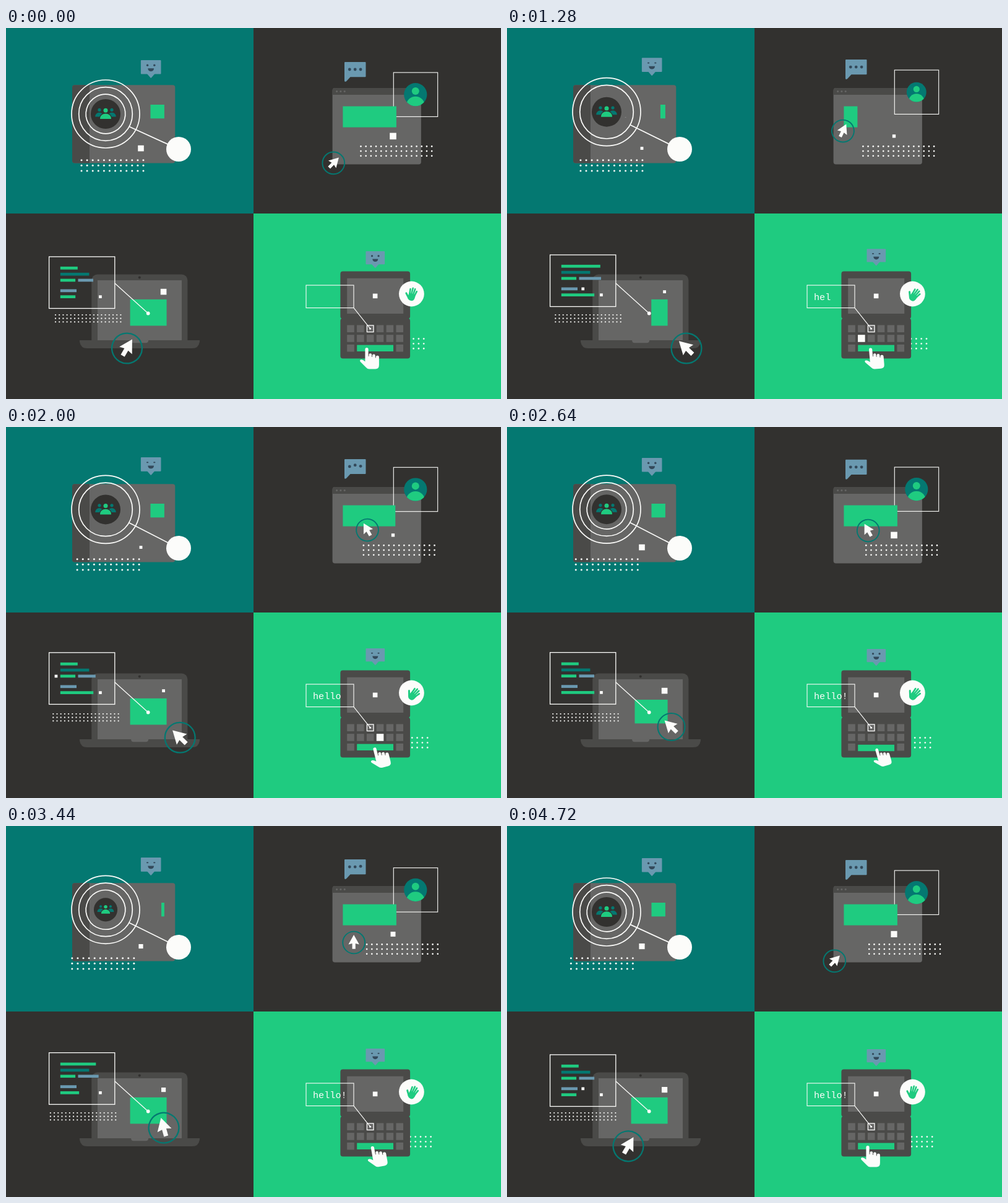
These frames come from a looping animation (800x600 px, 4800 ms). An HTML page:

```html
<!DOCTYPE html>
<html lang="en">
<head>
<meta charset="utf-8">
<title>Devices</title>
<style>
html, body { margin: 0; width: 100%; height: 100%; overflow: hidden; }
svg { display: block; width: 100%; height: 100%; }
.dark { fill: #32312f; }
.edge { fill: #4a4a48; }
.grey { fill: #666665; }
.teal { fill: #047871; }
.green { fill: #1fcb80; }
.blue { fill: #6a99b0; }
.ink { fill: #33495a; }
.white { fill: #fcfcfa; }
.line { fill: none; stroke: #fcfcfa; }
.ring { fill: none; stroke: #047871; }
text { font: 15.2px "Liberation Mono", "Noto Sans Mono", monospace; }
</style>
</head>
<body>
<svg viewBox="0 0 800 600">
  <defs>
    <g id="bubble" class="blue">
      <rect x="-16.3" width="32.6" height="22.6" rx="1"/>
      <path d="M-6.3 22H6.3L0.6 28.4Q0 29 -0.6 28.4Z"/>
      <path class="ink" d="M-4.8 13.3H4.8C4.8 19.8 -4.8 19.8 -4.8 13.3Z"/>
    </g>
    <path id="arrow" class="white" d="M0 -12.4L8.7 3L2.6 1.6V10.2H-2.6V1.6L-8.7 3Z"/>
    <clipPath id="round"><circle r="18.6"/></clipPath>
  </defs>

  <!-- top left: card with rings -->
  <rect class="teal" width="400" height="300"/>
  <rect class="grey" x="107" y="92.3" width="166.3" height="126.2" rx="4"/>
  <path class="edge" d="M135 92.3H111a4 4 0 0 0-4 4V214.5a4 4 0 0 0 4 4H135Z"/>
  <rect class="green" id="bar1" y="124" height="22.3"/>
  <rect class="white" id="sq1"/>
  <g id="dots1"></g>
  <path class="line" id="link1" stroke-width="1.7"/>
  <circle class="white" cx="279" cy="196" r="20"/>
  <g id="rings">
    <circle class="line" r="55" stroke-width="1.7"/>
    <circle class="line" r="43.3" stroke-width="1.7"/>
    <circle class="line" id="arc" r="31.8" stroke-width="1.7" pathLength="1" transform="rotate(16)"/>
    <g id="team">
      <circle class="dark" r="24"/>
      <g class="teal">
        <circle cx="-10" cy="-6.6" r="2.6"/><circle cx="10" cy="-6.6" r="2.6"/>
        <path d="M-16.8 4.5C-16.8 -4.5 -3.5 -4.5 -3.5 4.5ZM16.8 4.5C16.8 -4.5 3.5 -4.5 3.5 4.5Z"/>
      </g>
      <circle class="green" cy="-5.8" r="3.5"/>
      <path class="green" d="M-9 8C-9 -3.5 9 -3.5 9 8Z" stroke="#32312f" stroke-width="2.4" paint-order="stroke"/>
    </g>
  </g>
  <g id="face1"></g>

  <!-- top right: browser window -->
  <rect class="dark" x="400" width="400" height="300"/>
  <rect class="grey" x="527.6" y="97" width="143.3" height="123.5" rx="4"/>
  <path class="edge" d="M527.6 108V101a4 4 0 0 1 4-4H666.9a4 4 0 0 1 4 4V108Z"/>
  <g class="grey">
    <circle cx="534.6" cy="102.5" r="1.5"/><circle cx="540.9" cy="102.5" r="1.5"/><circle cx="547.2" cy="102.5" r="1.5"/>
  </g>
  <g id="frame2"><rect class="line" x="626.3" y="-35.7" width="71.4" height="71.4" stroke-width="1.1"/></g>
  <rect class="green" id="bar2" x="544.4" y="126.6" height="34"/>
  <g id="user">
    <circle class="teal" r="18.6"/>
    <circle class="green" cy="-5.6" r="6"/>
    <circle class="green" cy="18" r="15" clip-path="url(#round)"/>
  </g>
  <rect class="white" id="sq2"/>
  <g id="dots2"></g>
  <g id="chat">
    <path class="blue" d="M548 55H580.5a1 1 0 0 1 1 1V78.2a1 1 0 0 1-1 1H556.5L550 86.2Q547 88 547 85V56a1 1 0 0 1 1-1Z"/>
    <g class="ink" id="wave"><circle cx="555.3" r="2.4"/><circle cx="564.2" r="2.4"/><circle cx="573.1" r="2.4"/></g>
  </g>
  <g id="cursor2"><circle class="ring" r="17.9" stroke-width="1.9"/><use href="#arrow"/></g>

  <!-- bottom left: laptop with code -->
  <rect class="dark" y="300" width="400" height="300"/>
  <path class="edge" d="M138.3 506V408a9.5 9.5 0 0 1 9.5-9.5H283.9a9.5 9.5 0 0 1 9.5 9.5V506Z"/>
  <circle class="dark" cx="215.8" cy="403.6" r="2"/>
  <rect class="grey" x="148" y="408" width="136" height="97"/>
  <path class="edge" d="M119 505H313V506.5Q312 518 301 518H131Q120 518 119 506.5Z"/>
  <path class="grey" d="M202 504.8H230.3Q230 509.3 226 509.3H206Q202.3 509.3 202 504.8Z"/>
  <rect class="green" id="bar3"/>
  <rect class="white" id="sq3"/>
  <g id="dots3"></g>
  <path class="line" d="M176 413L229.7 461.5" stroke-width="1.3"/>
  <circle class="white" cx="229.7" cy="461.5" r="2.9"/>
  <g id="code">
    <rect class="line" x="69.6" width="106.2" height="83.6" stroke-width="1.3"/>
    <rect class="green" id="row1" x="87.8" y="16" height="4.7"/>
    <rect class="teal" x="87.8" y="25.9" width="46.6" height="4.7"/>
    <rect class="green" x="87.8" y="35.7" width="24.3" height="4.7"/>
    <rect class="blue" id="row3" x="116.5" y="35.7" height="4.7"/>
    <rect class="blue" x="87.8" y="52.6" width="26.2" height="4.7"/>
    <rect class="green" id="row5" x="87.8" y="62.4" height="4.7"/>
    <rect class="white" x="150.1" y="62.4" width="4.7" height="4.7"/>
    <rect class="white" id="blip1" x="120.4" y="52.6" width="4.7" height="4.7"/>
    <rect class="white" id="blip2" x="78.6" y="35.8" width="4.7" height="4.7"/>
  </g>
  <g id="cursor3"><circle class="ring" r="24.4" stroke-width="2.3"/><use href="#arrow" transform="scale(1.36)"/></g>

  <!-- bottom right: small computer with keys -->
  <rect class="green" x="400" y="300" width="400" height="300"/>
  <g id="dots4"></g>
  <rect class="edge" x="540.4" y="393.6" width="112.7" height="76.6" rx="4"/>
  <rect class="edge" x="540.4" y="469.4" width="112.7" height="65.2" rx="4"/>
  <rect class="grey" x="551.2" y="404.8" width="91" height="57.2"/>
  <rect class="white" x="592.8" y="429.6" width="7.6" height="7.6"/>
  <g id="keys"></g>
  <rect class="green" id="space" x="567.2" width="58.8" height="10.4"/>
  <rect class="line" x="485" y="416" width="77" height="36.6" stroke-width="1.1"/>
  <path class="line" d="M562 452.6L588.6 486.2" stroke-width="1.1"/>
  <rect class="line" x="583.4" y="481" width="10.6" height="10.6" stroke-width="1.3"/>
  <circle class="white" cx="588.6" cy="486.2" r="1.5"/>
  <text class="white" id="typed" x="496" y="440"></text>
  <circle class="white" cx="655.4" cy="430" r="20.4"/>
  <g id="palm" stroke="#1fcb80" stroke-linecap="round" fill="none">
    <path class="green" stroke="none" d="M-5.6 -8H5.6V-2Q5.2 3.5 0 3.5Q-4 3.5 -5.6 0Z"/>
    <path stroke-width="2.6" d="M-4.3 -7L-5.4 -14.6M-1.4 -7L-1.8 -17M1.5 -7L2 -16.6M4.3 -7L5.6 -13.6"/>
    <path stroke-width="3" d="M-4 0L-9.8 -6"/>
  </g>
  <g id="face4"></g>
  <path class="white" id="hand" d="M-2.6 2.6a2.6 2.6 0 0 1 5.2 0V14h.9V11.5a2.3 2.3 0 0 1 4.6 0V15h.9V13a2.4 2.4 0 0 1 4.8 0V16.5h.9V15.4a2.6 2.6 0 0 1 5.2 0V28Q20 34.5 14 34.5H4Q1 34.5 -1 32L-10.5 22.5Q-11.8 20.5 -10 19.5Q-7 18.5 -2.6 22.5Z"/>
</svg>
<script>
const LOOP = 4800;
const WORD = "hello!";
const LAYOUT = "!    e l oh ";   // two rows of six keys

const $ = id => document.getElementById(id);
const set = (id, attrs) => {
  for (const name in attrs) $(id).setAttribute(name, attrs[name]);
};
const move = (id, x, y, rot = 0, scale = 1) =>
  set(id, { transform: `translate(${x} ${y}) rotate(${rot}) scale(${scale})` });
const show = (id, on) => set(id, { visibility: on ? "visible" : "hidden" });
const square = (id, x, y, size) =>
  set(id, { x: x - size / 2, y: y - size / 2, width: size, height: size });

// Soft step from 0 to 1 between two times, and a rise followed by a fall.
const ease = (t, from, to) =>
  (1 - Math.cos(Math.PI * Math.min(1, Math.max(0, (t - from) / (to - from))))) / 2;
const swell = (t, a, b, c, d) => ease(t, a, b) - ease(t, c, d);

function dots(id, x, y, cols, dx, dy, r) {
  let out = "";
  for (let i = 0; i < cols * 3; i++)
    out += `<circle class="white" cx="${x + i % cols * dx}" cy="${y + Math.floor(i / cols) * dy}" r="${r}"/>`;
  $(id).innerHTML = out;
}

dots("dots1", 122, 213.8, 12, 9.09, 8.55, 1.5);
dots("dots2", 573.5, 191.4, 15, 8.19, 7.7, 1.35);
dots("dots3", 80, 464, 18, 6.2, 5.65, 1.1);
dots("dots4", 633.7, 502.6, 6, 8.3, 7.9, 1.35);

for (const id of ["face1", "face4"])
  $(id).innerHTML = '<use href="#bubble"/>' + [-5.6, 5.6].map(x =>
    `<ellipse class="ink" cx="${x}" cy="8.2" rx="1.7"/>`).join("");

let keys = "";
for (let i = 0; i < 18; i++) {
  const col = i % 6, row = Math.floor(i / 6);
  if (row < 2 || col % 5 === 0)
    keys += `<rect x="${551.2 + col * 15.85}" y="${480.5 + row * 15.7}" width="11.6" height="11.6"/>`;
}
$("keys").innerHTML = keys;

function eyes(id, open) {
  for (const eye of $(id).querySelectorAll("ellipse")) eye.setAttribute("ry", 1.7 * open);
}

function drawCard(t, s) {
  const cy = 136 + 3 * s.sway;
  move("rings", 161, cy);
  set("link1", { d: `M199.2 ${157 + 2.4 * s.sway}L279 196` });
  const cut = ease(t, 300, 1300), grown = ease(t, 2020, 2600);
  set("arc", { "stroke-dasharray": `${1.001 - cut + grown} 2`, "stroke-dashoffset": grown ? 0 : -cut });
  show("arc", cut < 1 || grown > 0);
  move("team", 0, 0, 0, 1 - .21 * swell(s.half, 260, 640, 1020, 1260));
  const width = 22.4 - 17.6 * swell(s.half, 250, 640, 1080, 1800);
  set("bar1", { x: 255.9 - width, width });
  square("sq1", 218, 194.6, 9.6 * s.pulse);
  move("dots1", -18.6 * s.drift, 0);
  move("face1", 234.2, 52 - 4 * s.hop);
  eyes("face1", s.open);
}

function drawBrowser(t, s) {
  const cy = 104.1 + 3.6 * s.sway;
  move("frame2", 0, cy);
  move("user", 661.8, cy, 0, 1 - .2 * swell(t, 150, 640, 1000, 1800));
  set("bar2", { width: 86.5 - 64.5 * swell(t, 100, 560, 1300, 2080) });
  square("sq2", 625.5, 174.9, 10.6 * s.pulse);
  move("dots2", 11.8 * s.drift, 0);
  move("chat", 0, -4.3 * s.hop);
  [...$("wave").children].forEach((dot, i) => {
    const peak = 600 + 165 * i;
    dot.setAttribute("cy", 67 - 2.4 * swell(t % 1200, peak - 190, peak, peak, peak + 190));
  });
  const lean = swell(t, 900, 2050, 2500, 4650);
  const lift = swell(t, 0, 1100, 2450, 4650);
  move("cursor2", 529.3 + 55 * lean, 218.4 - 51.8 * lift, 44 - 74 * lean);
}

function drawLaptop(t, s) {
  const width = s.press * (59 - 45 * swell(t, 150, 640, 1000, 1800));
  const height = 42.6 * s.press;
  set("bar3", { x: 259.6 - width, y: 460.2 - height / 2, width, height });
  square("sq3", 254.6, 426.6, 9.6 * s.pulse);
  move("dots3", -10 * s.drift, 0);
  move("code", 0, 367.2 + 2.7 * s.sway);
  set("row1", { width: 28 + 35 * (swell(t, 100, 600, 1300, 1950) + swell(t, 2700, 3700, 3800, 4500)) });
  set("row3", { width: 24.5 + 11 * swell(s.half, 500, 1280, 1400, 2400) });
  set("row5", { width: 24.4 + 29 * swell(t, 600, 1300, 2600, 3800) });
  show("blip1", t > 1000 && t < 1500 || t > 4400 && t < 4780);
  show("blip2", t > 1760 && t < 2300);
  move("cursor3",
    195.5 + 94.5 * ease(t, 0, 1080) - 35 * ease(t, 1280, 3440) - 59.5 * ease(t, 3440, LOOP),
    518 - 33 * swell(t, 1400, 2640, 3100, LOOP),
    30 - 76 * swell(t, 0, 1200, 2700, 4400), s.press);
}

function drawKeys(t, s) {
  const since = t - 200, count = Math.ceil(since / 400);
  const typed = WORD.slice(0, Math.max(0, count));
  const lit = typed && since <= 400 * WORD.length && since % 400 < 300
    ? LAYOUT.indexOf(typed.at(-1)) : -1;
  $("typed").textContent = typed;
  [...$("keys").children].forEach((key, i) =>
    key.setAttribute("class", i === lit ? "white" : "grey"));
  set("space", { y: 512.6 + 12 * (1 - s.press) });
  move("dots4", 12 * ease(t, 0, 4000), 0);
  move("face4", 596.8, 361 - 4 * s.hop, 0, .94);
  eyes("face4", s.open);
  move("palm", 654.5, 437.5, 17 + 26 * swell(t, 200, 1700, 2400, 4300));
  const lean = swell(t, 600, 2400, 2700, 4500);
  move("hand", 583 + 14 * lean, 517 + 1.6 * lean + 14 * (1 - s.press), -16 * lean, s.press);
}

function draw(t) {
  const half = t % (LOOP / 2);
  const shared = {
    half,
    sway: Math.cos(2 * Math.PI * t / LOOP),
    drift: ease(t, 0, LOOP),
    hop: swell(t, 0, 480, 480, LOOP),
    pulse: 1 - .5 * swell(half, 760, 1320, 1980, 2400),
    open: 1 - .4 * swell(half, 700, 1000, 2000, 2300),
    press: 1 - .1 * swell(t, 2380, 2620, 2660, 2900)
  };
  for (const part of [drawCard, drawBrowser, drawLaptop, drawKeys]) part(t, shared);
}

const start = performance.now();
function tick() {
  draw((performance.now() - start) % LOOP);
  requestAnimationFrame(tick);
}
tick();
</script>
</body>
</html>
```
